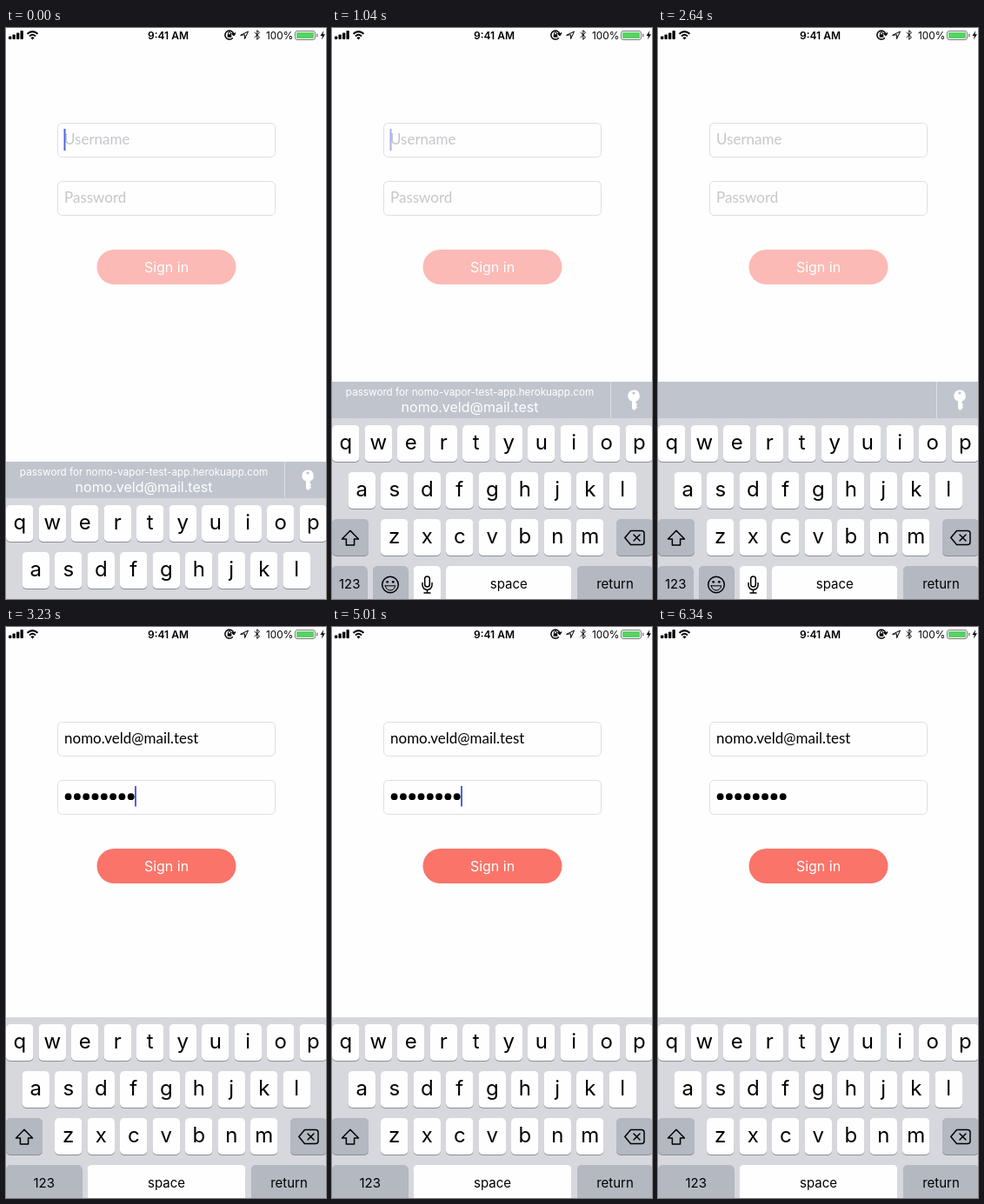
Write an HTML page that moves like this. It is 368 by 657 pixels and loops after 6440 ms.

```html
<!DOCTYPE html>
<html lang="en">
<head>
<meta charset="utf-8">
<title>Sign in with a saved password</title>
<style>
  html, body { margin: 0; width: 100%; height: 100%; overflow: hidden; background: #fefefe; }
  svg { display: block; width: 368px; height: 657px; font-family: Inter, "Noto Sans", sans-serif; }
  .field { fill: #fefefe; stroke: #dfdfe1; }
  .input { font: 17px Lato, "Open Sans", sans-serif; }
  .hint { fill: #c7c7cb; }
  .mid { text-anchor: middle; }
  .letter { font-size: 24px; }
  .word { font-size: 15px; }
  .line { fill: none; stroke: #000; stroke-width: 1.5; stroke-linejoin: round; stroke-linecap: round; }
  .thin { stroke-width: 1; }
</style>
</head>
<body>
<svg id="stage" viewBox="0 0 368 657"></svg>
<script>
const LOOP = 6440;
const STEP = 147.4;
const EMAIL = "nomo.veld@mail.test";
const SITE = "nomo-vapor-test-app.herokuapp.com";
const BLANK_STEP = 17, FILL_STEP = 21;

// Caret fades: [step, level reached after one half-lit step]
const FADES = [
  [4, 0], [7, 1], [10, 0], [13, 1], [16, 0],
  [25, 0], [29, 1], [31, 0], [33, 1], [36, 0], [39, 1], [42, 0]
];

const text = (x, y, label, cls, extra = "") =>
  `<text x="${x}" y="${y}" class="${cls}" ${extra}>${label}</text>`;
const rect = (x, y, w, h, r, fill) =>
  `<rect x="${x}" y="${y}" width="${w}" height="${h}" rx="${r}" fill="${fill}"/>`;
const line = (d, cls = "") => `<path class="line ${cls}" d="${d}"/>`;
const group = (id, content) => `<g id="${id}">${content}</g>`;

function key(x, y, w, label = "", cls = "letter", fill = "#fefefe") {
  const base = y + (cls === "letter" ? 27.5 : 26);
  return rect(x, y + 1, w, 42, 5, "#8b8e94") + rect(x, y, w, 42, 5, fill) +
    text(x + w / 2, base, label, cls + " mid");
}
const darkKey = (x, y, w, label) => key(x, y, w, label, "word", "#b3b8c1");
const keyRow = (letters, x, y) =>
  [...letters].map((c, i) => key(x + i * 37.5, y, 31.5, c)).join("");

function statusBar() {
  const bars = [3.5, 5.5, 7.5, 10].map((h, i) => rect(3 + i * 4.5, 13 - h, 3.3, h, .8, "#000")).join("");
  const wifi = `<g fill="none" stroke="#000" stroke-width="2">
    <path d="M24.5 6.8Q30.5 1.4 36.5 6.8M27 9.4Q30.5 6.2 34 9.4"/></g>
    <path d="M28.4 11.2Q30.5 9.4 32.6 11.2L30.5 13.4Z"/>`;
  const lock = line("M260.4 11.7A5 5 0 1 1 261.8 7M260 6.5L262 8.4L263.5 6") +
    rect(254.7, 7.2, 4.6, 3.6, .5, "#000") + line("M255.6 7V6a1.4 1.4 0 0 1 2.8 0V7", "thin");
  const arrow = line("M270 8.2L278.5 4L274.6 12.5V8.2Z", "thin");
  const bluetooth = line("M286 5.3L291.5 10.7L288.8 13.3V2.7L291.5 5.3L286 10.7", "thin");
  const battery = `<rect x="332.5" y="3.5" width="23" height="10" rx="2.5" fill="none" stroke="#777"/>` +
    rect(334, 5, 20, 7, 1, "#58d264") + rect(357, 6.5, 1.4, 4, .7, "#777") +
    `<path d="M365.4 3L361.5 9H364L362.8 13.5L367 7.2H364.4Z"/>`;
  return bars + wifi + text(186.5, 12.5, "9:41 AM", "mid", 'font-size="12" font-weight="600"') +
    lock + arrow + bluetooth + text(299, 12.5, "100%", "", 'font-size="11.8"') + battery;
}

function form() {
  const box = y => `<rect class="field" x="59.5" y="${y}" width="250" height="39" rx="5"/>`;
  const dots = Array.from({ length: 8 }, (_, i) =>
    `<circle cx="${71.6 + i * 10.3}" cy="195.2" r="3.9"/>`).join("");
  return box(109.5) + box(176.5) +
    group("hints", text(67, 134, "Username", "input hint") + text(67, 201, "Password", "input hint")) +
    group("values", text(67, 134, EMAIL, "input") + dots) +
    `<rect id="caret" width="2" fill="#4a66de"/>` +
    `<rect id="button" x="104.5" y="255" width="160" height="40" rx="20"/>` +
    text(184.5, 281, "Sign in", "mid", 'font-size="16" fill="#fff"');
}

function suggestionBar() {
  return `<rect id="barFill" y="407" width="368" height="42"/>` +
    rect(320, 407, 1, 42, 0, "#dcdfe4") +
    group("suggestion", `<g fill="#fff">` +
      text(158.5, 422.5, "password for " + SITE, "mid", 'font-size="11.7"') +
      text(158.5, 442, EMAIL, "mid", 'font-size="16"') + `</g>`) +
    `<path fill="#fff" fill-rule="evenodd" d="M347 416.5a6.7 6.7 0 0 1 2.6 12.9V432l1.6 1.6l-1.6 1.6l1.6 1.6L347.4 440
      L345 438V429.6A6.7 6.7 0 0 1 347 416.5ZM347 418.4a1.6 1.6 0 1 0 .01 0Z"/>`;
}

function keyboard() {
  const shift = line("M21 578.3L30.5 588H25.6V595H16.4V588H11.5Z");
  const erase = line("M343.5 578.5H356Q359 578.5 359 581.5V591.5Q359 594.5 356 594.5H343.5L336.8 586.5Z") +
    line("M347 583L354 590M354 583L347 590");
  const smile = `<circle class="line" cx="67" cy="640.5" r="9.3"/>
    <circle cx="63.7" cy="637.3" r="1.4"/><circle cx="70.3" cy="637.3" r="1.4"/>` +
    line("M61.2 641.8H72.8Q71.5 647 67 647Q62.5 647 61.2 641.8Z", "thin");
  const mic = `<rect class="line" x="106.7" y="631" width="5.6" height="12" rx="2.8"/>` +
    line("M104 638.5V641a5.5 5.5 0 0 0 11 0V638.5M109.5 646.5V650M106 650H113");
  return rect(0, 449, 368, 208, 0, "#d6d8de") +
    keyRow("qwertyuiop", 0, 457) + keyRow("asdfghjkl", 18.5, 511) + keyRow("zxcvbnm", 56, 565) +
    darkKey(0, 565, 42) + shift + darkKey(327, 565, 42) + erase +
    darkKey(282, 619, 87, "return") +
    group("emailKeys", darkKey(0, 619, 40.5, "123") + darkKey(47, 619, 40.5) + smile +
      key(93.5, 619, 31.5) + mic + key(131, 619, 144.5, "space", "word")) +
    group("passwordKeys", darkKey(0, 619, 87.5, "123") + key(93.5, 619, 182, "space", "word"));
}

const stage = document.getElementById("stage");
stage.innerHTML = rect(0, 0, 368, 657, 0, "#fefefe") + statusBar() + form() +
  group("panel", group("bar", suggestionBar()) + keyboard());

const part = id => document.getElementById(id);
const set = (id, attrs) => {
  for (const name in attrs) part(id).setAttribute(name, attrs[name]);
};
const show = (id, visible) => set(id, { visibility: visible ? "visible" : "hidden" });

function caretLevel(step) {
  if (step >= BLANK_STEP && step < FILL_STEP) return 0;
  if (step >= FILL_STEP && step < 25) return 1;
  const last = FADES.filter(([start]) => start <= step).pop();
  if (!last) return 1;
  return last[0] === step ? .5 : last[1];
}

function draw(time) {
  const step = Math.floor((time + 14) / STEP);
  const filled = step >= FILL_STEP;
  const slide = Math.round(92 * Math.exp(-15.3 * step * STEP / 1000));

  set("panel", { transform: `translate(0 ${slide})` });
  set("barFill", { fill: step >= 11 && step < 14 ? "#cec5cb" : "#c0c4cd" });
  set("button", { fill: filled ? "#fa7469" : "#fbbab5" });
  set("caret", {
    x: filled ? 148 : 66.5, y: filled ? 183 : 116,
    height: filled ? 23.5 : 25, opacity: caretLevel(step)
  });
  show("hints", !filled);
  show("values", filled);
  show("bar", !filled);
  part("suggestion").style.display = step < BLANK_STEP ? "" : "none";
  show("emailKeys", !filled);
  show("passwordKeys", filled);
}

const start = performance.now();
function tick() {
  draw((performance.now() - start) % LOOP);
  requestAnimationFrame(tick);
}
draw(0);
requestAnimationFrame(tick);
</script>
</body>
</html>
```
